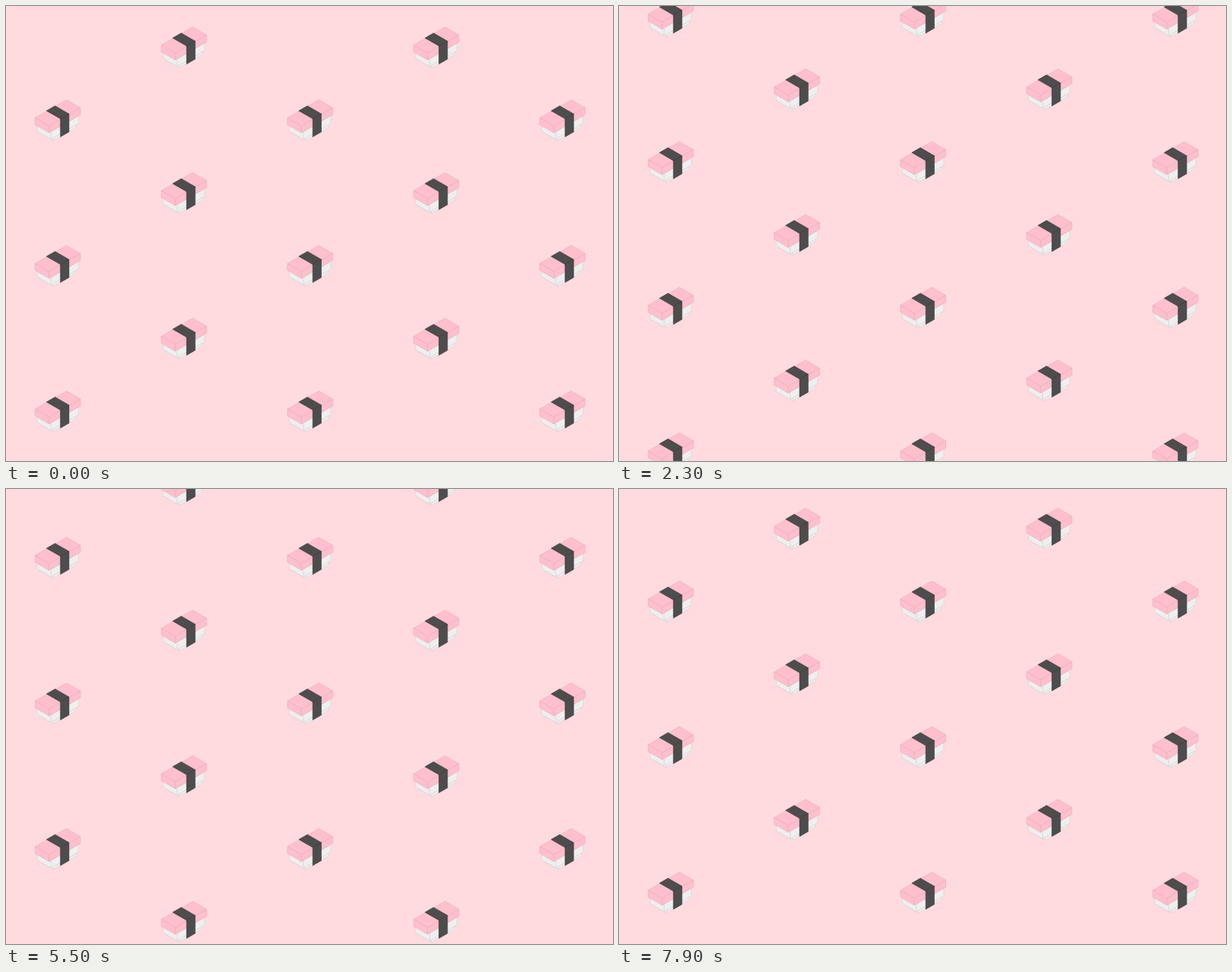
These frames come from a looping animation (800 px wide and 600 px high, 8 s). An HTML page with a canvas:

```html
<!DOCTYPE html>
<html lang="en">
<head>
<meta charset="utf-8">
<title>Sushi pattern</title>
<style>
html, body { margin: 0; width: 100%; height: 100%; overflow: hidden; background: #ffdade; }
canvas { display: block; }
</style>
</head>
<body>
<canvas id="stage" width="800" height="600"></canvas>
<script>
const ctx = document.getElementById('stage').getContext('2d');
const LOOP = 8000, STEP = 100;
const ROW = 192, COL = ROW * Math.sqrt(3);
const LENGTH = 47.7, WIDTH = 21.2;
const COS = Math.sqrt(3) / 2;

const RICE = { fill: '#efefef', line: '#d6d2d2' };
const PINK = { fill: '#ffbfcd', line: '#e4adb9' };
const NORI = { fill: '#4d4d4d', line: '#343434' };

// Isometric axes: u runs along the piece, v across it, z upwards.
const iso = (u, v, z) => [(u + v) * COS, (v - u) / 2 - z];

function face(skin, ...corners) {
  ctx.beginPath();
  for (const c of corners) ctx.lineTo(...iso(...c));
  ctx.closePath();
  ctx.fillStyle = skin.fill;
  ctx.strokeStyle = skin.line;
  ctx.fill();
  ctx.stroke();
}

function box(skin, u0, u1, low, high, capped = true) {
  const v = WIDTH;
  face(skin, [u0, 0, high], [u1, 0, high], [u1, v, high], [u0, v, high]);
  face(skin, [u0, v, high], [u1, v, high], [u1, v, low], [u0, v, low]);
  if (capped) face(skin, [u0, 0, high], [u0, v, high], [u0, v, low], [u0, 0, low]);
}

function sushi(x, y) {
  ctx.save();
  ctx.translate(x, y);
  ctx.lineWidth = 0.6;
  ctx.lineJoin = 'round';
  box(RICE, 6, LENGTH - 6, -22.4, -19);
  box(RICE, 3, LENGTH - 3, -19, -9);
  box(PINK, 0, LENGTH, -9, 0);
  box(NORI, 17.3, 30.3, -23, 0.8, false);
  ctx.restore();
}

function draw(now) {
  const t = Math.floor((now % LOOP) / STEP) * STEP;
  const shift = ROW * t / LOOP;
  ctx.fillStyle = '#ffdade';
  ctx.fillRect(0, 0, 800, 600);
  for (let c = 0; c < 5; c++) {
    const top = (c % 2 ? 51.6 : 147.6) + shift - ROW;
    for (let y = top; y < 640; y += ROW) sushi(38.4 + c * COL / 2, y);
  }
  requestAnimationFrame(draw);
}

requestAnimationFrame(draw);
</script>
</body>
</html>
```
